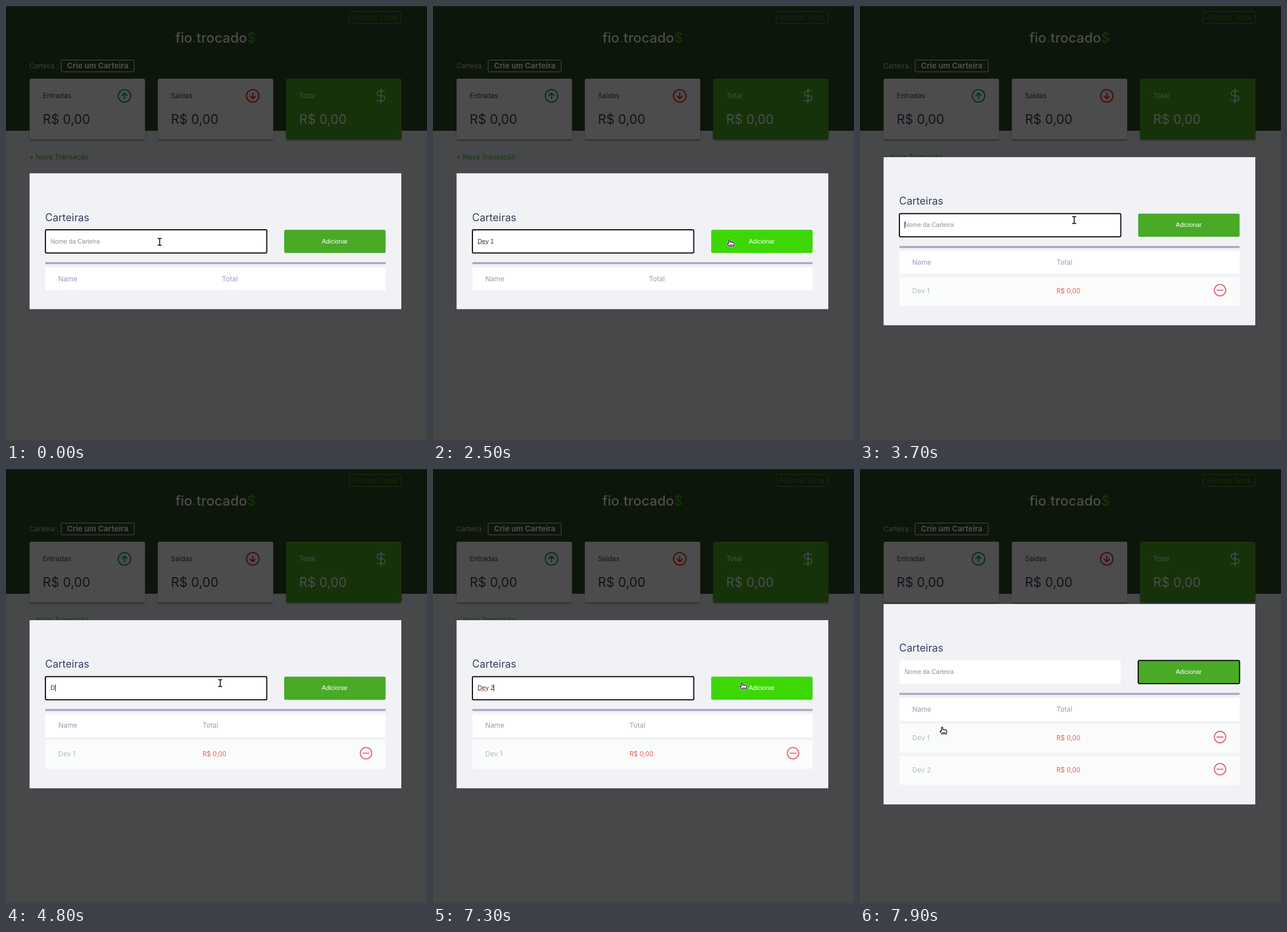
These frames come from a looping animation (737 by 760 pixels, 8000 ms). An HTML page:

```html
<!DOCTYPE html>
<html lang="pt-BR">
<head>
<meta charset="utf-8">
<title>Carteiras</title>
<style>
html, body { margin: 0; width: 100%; height: 100%; overflow: hidden; background: #484949; }
svg { display: block; }
text { font-family: Inter, "Open Sans", sans-serif; font-size: 12px; white-space: pre; }
.ui { font-family: "Liberation Sans", Arial, sans-serif; font-size: 10.9px; }
.big { font-size: 22.5px; }
.light { font-weight: 300; }
.line { fill: none; stroke-linecap: round; stroke-linejoin: round; }
</style>
</head>
<body>
<svg width="737" height="760" viewBox="0 0 737 760">
  <defs>
    <filter id="shadow" x="-10%" y="-10%" width="120%" height="130%">
      <feDropShadow dx="0" dy="2" stdDeviation="1.5" flood-opacity=".4"/>
    </filter>
  </defs>
  <rect width="737" height="760" fill="#f0f2f5"/>
  <rect width="737" height="218" fill="#2d4a22"/>
  <rect width="737" height="1" fill="#5f7856"/>
  <rect y="757" width="737" height="3" fill="#fbd8d8"/>

  <rect x="600.5" y="9.5" width="91" height="21" rx="3" fill="none" stroke="#49aa26"/>
  <text x="646" y="24" text-anchor="middle" class="light" fill="#49aa26">Alternar Tema</text>
  <text x="367" y="64" text-anchor="middle" font-weight="500" style="font-size:24px" fill="#fff">fio<tspan fill="#49aa26">.</tspan>trocado<tspan fill="#49aa26">$</tspan></text>
  <text x="41" y="108.500" class="light" fill="#fff">Carteira :</text>
  <rect x="96.500" y="94.500" width="128" height="20.500" rx="2" fill="none" stroke="#fff"/>
  <text x="160.500" y="109" text-anchor="middle" font-weight="700" style="font-size:13.5px" fill="#fff">Crie um Carteira</text>
  <g id="cards"></g>
  <g class="line" stroke-width="2">
    <path stroke="#12a454" d="M196.500 157a11 11 0 1 0 22 0a11 11 0 1 0-22 0M207.500 162v-10M203 156.500l4.500-4.500l4.500 4.500"/>
    <path stroke="#e92929" d="M421 157a11 11 0 1 0 22 0a11 11 0 1 0-22 0M432 152v10M427.500 157.500l4.500 4.500l4.500-4.500"/>
    <path stroke="#fff" stroke-width="1.700" d="M656.500 144.500v25M663 148.500h-9a4.200 4.200 0 0 0 0 8.400h5a4.300 4.300 0 0 1 0 8.600h-9.500"/>
  </g>
  <text x="41" y="268" fill="#49aa26">+ Nova Transação</text>
  <rect width="737" height="760" opacity=".7"/>

  <rect id="panel" x="41.300" width="650.700" fill="#f0f2f5"/>
  <g id="modal">
    <text x="68.500" y="375.500" style="font-size:18px" fill="#363f5f">Carteiras</text>
    <rect id="field" x="69" y="391" width="387.500" height="40.500" rx="2" fill="#fff"/>
    <text id="typed" class="ui" x="78" y="414.500"></text>
    <path id="spell" class="line" stroke="#e0504a" stroke-width=".9" d="M78 415.500q1-1.600 2 0t2 0t2 0t2 0t2 0t2 0t2 0t2 0t2 0"/>
    <rect id="caret" y="404.500" width="1" height="12" fill="#222"/>
    <rect id="button" x="487" y="391" width="177.500" height="40.500" rx="2.500"/>
    <text class="ui" x="575.500" y="414.500" text-anchor="middle" fill="#fff">Adicionar</text>
    <rect x="69" y="447.500" width="595.500" height="3.500" fill="#a7a9bf"/>
    <rect x="69" y="456.500" width="595.500" height="40" fill="#fff"/>
    <text x="91.500" y="480.500" fill="#969cb3">Name</text>
    <text id="total" y="480.500" fill="#969cb3">Total</text>
    <g id="rows"></g>
  </g>
  <g id="pointer"><path class="line" stroke="#fff"/><path class="line"/></g>
</svg>
<script>
const $ = id => document.getElementById(id);
const show = (node, on) => node.setAttribute('visibility', on ? 'visible' : 'hidden');
const set = (node, attrs) => { for (const k in attrs) node.setAttribute(k, attrs[k]); };
const within = (t, ...spans) => spans.some(([a, b]) => t >= a && t < b);
const latest = (keys, t) => keys.filter(k => k[0] <= t).pop();

$('cards').innerHTML = ['Entradas', 'Saídas', 'Total'].map((name, i) => {
  const x = 41.3 + 224.5 * i, green = i == 2, ink = green ? '#fff' : '#363f5f';
  return `<rect x="${x}" y="127" width="202" height="106" rx="3" fill="${green ? '#49aa26' : '#fff'}" filter="url(#shadow)"/>
    <text x="${x + 23}" y="161" fill="${ink}">${name}</text>
    <text x="${x + 23}" y="206" class="big" fill="${ink}">R$ 0,00</text>`;
}).join('');

$('rows').innerHTML = [1, 2].map(n => `<g transform="translate(0 ${56.2 * (n - 1)})">
    <rect x="69" y="501.700" width="595.500" height="50.500" fill="#fafcfb"/>
    <text x="91.500" y="530.500" fill="#b3b8c8">Dev ${n}</text>
    <text x="344" y="530.500" style="font-size:11.3px" fill="#e85f5c">R$ 0,00</text>
    <g class="line" stroke="#ea7083" stroke-width="2.200"><circle cx="630.300" cy="524.700" r="10"/><path d="M625 524.700h10.500"/></g>
  </g>`).join('');

const typing = [
  [0, ''], [100, 'D'], [500, 'De'], [900, 'Dev'], [1300, 'Dev '], [1400, 'Dev 1'],
  [2700, ''], [4800, 'D'], [5200, 'De'], [5500, 'Dev'], [5900, 'Dev '], [6000, 'Dev 2'], [7400, '']
];
// time, x, y, cursor shape
const moves = [
  [0, 269, 412, 'beam'], [2000, 300, 416, 'beam'], [2100, 360, 422, 'beam'], [2200, 425, 427, 'beam'],
  [2300, 472, 431, 'arrow'], [2400, 502, 423, 'hand'], [2500, 521, 414, 'hand'],
  [3200, 480, 408, 'arrow'], [3300, 420, 388, 'beam'], [3400, 375, 374, 'beam'],
  [6900, 425, 376, 'beam'], [7000, 505, 378, 'hand'], [7100, 543, 379, 'hand'],
  [7600, 470, 398, 'arrow'], [7700, 350, 425, 'arrow'], [7800, 225, 448, 'arrow'], [7900, 146, 457, 'hand']
];
// path, fill, outer stroke, inner stroke
const shapes = {
  beam: ['M-3-6h2l1 1l1-1h2M-3 6h2l1-1l1 1h2M0-5V5', 'none', 3.4, 1.5],
  arrow: ['M-4-7v13l3-3l2 5l2-1l-2-4.500h4z', '#000', 2.4, .8],
  hand: ['M-3.500 1V-5.500q1.200-1.500 2.400 0V-1.500q1.200-1 2.300 .300q1.300-1 2.300 .400q1.500-.8 2.300 .700V3l-1 3H-2.500l-3.500-4.500q1-1.500 2.500-.5zM-1.500 3v1.500M.7 3v1.500M2.900 3v1.500', '#fff', 2.6, 1.2]
};

function draw(t) {
  const rows = within(t, [0, 2700]) ? 0 : t < 7400 ? 1 : 2, shift = 28.2 * rows;
  set($('panel'), { y: 292.3 - shift, height: 237.3 + 2 * shift });
  set($('modal'), { transform: `translate(0 ${-shift})` });
  set($('total'), { x: rows ? 344 : 378 });
  [...$('rows').children].forEach((row, i) => show(row, i < rows));

  const text = latest(typing, t)[1], typed = $('typed');
  typed.textContent = text || 'Nome da Carteira';
  set(typed, { fill: text ? '#333' : '#8b8e99' });
  set($('caret'), { x: Math.round(78 + (text ? typed.getComputedTextLength() : 0)) });
  show($('caret'), within(t, [100, 2000], [3700, 4300], [4800, 6700], [7300, 7400]));
  show($('spell'), within(t, [2000, 2700], [5900, 7400]));

  const ring = on => ({ stroke: on ? '#101010' : 'none', 'stroke-width': 2 });
  const fieldFocus = within(t, [0, 2700], [3600, 7400]);
  set($('field'), ring(fieldFocus));
  set($('button'), { ...ring(!fieldFocus), fill: within(t, [2400, 2700], [7000, 7600]) ? '#3dd705' : '#49aa26' });

  const [, x, y, kind] = latest(moves, t), [d, fill, outer, inner] = shapes[kind];
  const [halo, body] = $('pointer').children;
  set($('pointer'), { transform: `translate(${x} ${y})` });
  set(halo, { d, 'stroke-width': outer });
  set(body, { d, style: `fill:${fill}`, stroke: '#000', 'stroke-width': inner });
}

const start = performance.now();
function tick() {
  draw((performance.now() - start) % 8000);
  requestAnimationFrame(tick);
}
tick();
</script>
</body>
</html>
```
